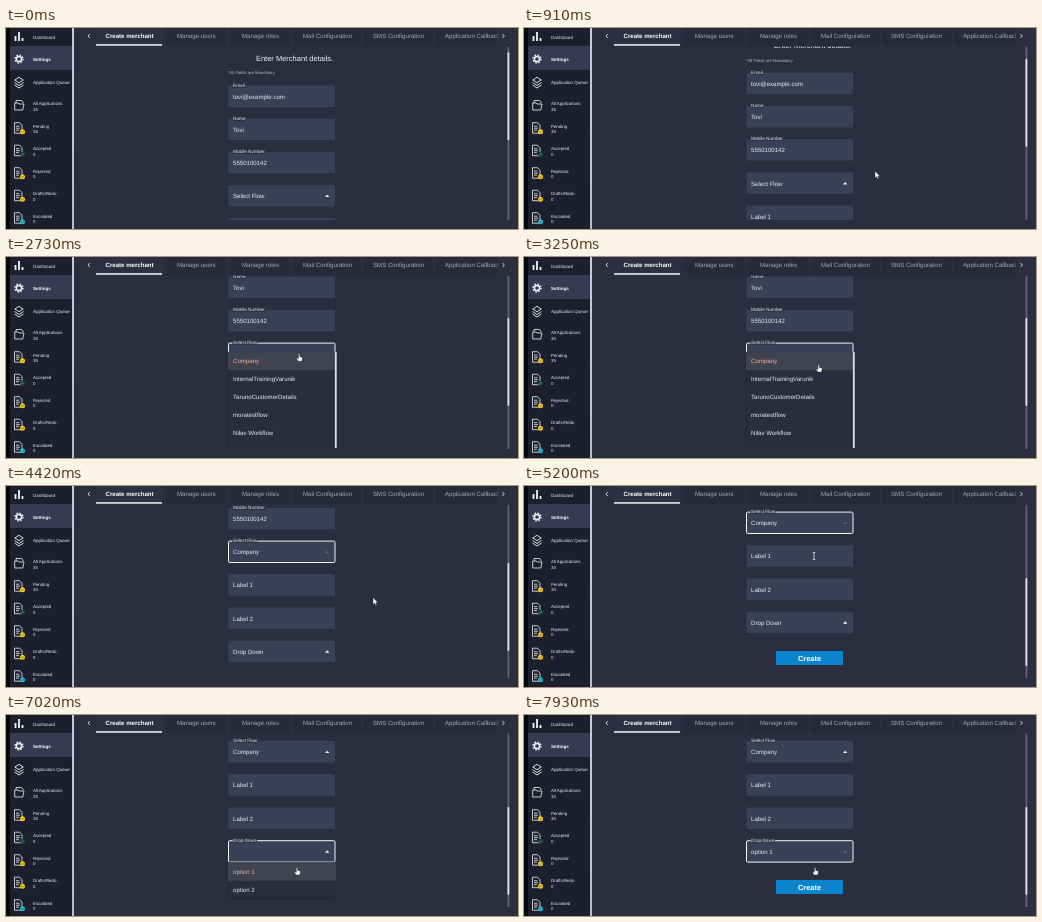
An HTML page that plays this animation: 512x201 px, repeating every 8 s.

```html
<!DOCTYPE html>
<html lang="en">
<head>
<meta charset="utf-8">
<title>Create merchant</title>
<style>
  html, body { margin: 0; width: 100%; height: 100%; overflow: hidden; background: #2b2e3f; }
  svg { display: block; width: 512px; height: 201px; }
  text { font-family: "Liberation Sans", Arial, sans-serif; text-rendering: geometricPrecision; }
</style>
</head>
<body>
<svg viewBox="0 0 512 201">
  <defs>
    <linearGradient id="edge" x2="0" y2="1">
      <stop stop-color="#c3cee0"/><stop offset="1" stop-color="#b4bfd2"/>
    </linearGradient>
    <clipPath id="view"><path d="M70 18.5H512V192H70Z"/></clipPath>
  </defs>
  <path fill="#2b2e3f" d="M0 0H512V201H0Z"/>
  <path fill="#1d1f2d" d="M0 0H66V201H0Z"/>
  <path fill="#07080c" d="M0 0H4V201H0Z"/>
  <path fill="url(#edge)" d="M66 0H68V201H66Z"/>
  <g id="side"></g>
  <g id="tabs"></g>
  <g id="form" clip-path="url(#view)"></g>
  <g id="pointer"></g>
</svg>
<script>
const LOOP = 8000, STEP = 130;
const BG = '#2b2e3f', FIELD = '#3a4157', WHITE = '#f2f4f8';
const $ = id => document.getElementById(id);

const text = (x, y, s, size = 6.1, fill = '#e8eaf0', more = '') =>
  `<text x="${x}" y="${y + size * .35}" font-size="${size}" fill="${fill}" ${more}>${s}</text>`;
const rect = (x, y, w, h, fill, more = '') =>
  `<rect x="${x}" y="${y}" width="${w}" height="${h}" fill="${fill}" ${more}/>`;
const path = (d, more) => `<path d="${d}" ${more}/>`;
const line = (d, width = 1, color = WHITE) =>
  path(d, `fill="none" stroke="${color}" stroke-width="${width}"`);

// Linear interpolation through [time, ...values] keys
function at(keys, t) {
  const i = keys.findIndex(k => k[0] > t);
  if (i < 0) return keys[keys.length - 1].slice(1);
  if (i === 0) return keys[0].slice(1);
  const a = keys[i - 1], b = keys[i], p = (t - a[0]) / (b[0] - a[0]);
  return a.slice(1).map((v, n) => v + (b[n + 1] - v) * p);
}

function sidebar() {
  let out = rect(4, 18, 62, 24, '#373a51');
  out += line('M9.5 13V8M13 13V4M16.5 13V10', 1.8);
  out += `<circle cx="13" cy="31" r="2.6" fill="none" stroke="${WHITE}" stroke-width="1.5"/>`;
  out += `<circle cx="13" cy="31" r="4" fill="none" stroke="${WHITE}" stroke-width="1.3" stroke-dasharray="1.6 1.54"/>`;
  out += line('M13 49.3L17.2 52L13 54.7L8.8 52ZM8.5 54.5L13 57.5L17.5 54.5M8.5 57L13 60L17.5 57', .9);
  out += line('M10 75V72.5H15.5L17 74V75M8.7 82V75H12L13 76H18L16.8 82Z', .8);
  out += text(27, 9, 'Dashboard', 4.5) + text(27, 31, 'Settings', 4.5, '#fff', 'font-weight="bold"')
    + text(27, 54, 'Application Queue', 4.5);
  const rows = [['All Applications', 35], ['Pending', 35, '#f8d010'], ['Accepted', 0, '#174a3a'],
    ['Rejected', 0, '#f0c814'], ['Drafts/Redo', 0, '#f0c814'], ['Escalated', 0, '#25b9d0']];
  rows.forEach(([name, count, badge], i) => {
    const y = 75.7 + i * 22.5;
    out += text(27, y, name, 4.4) + text(27, y + 5.5, count, 4.4);
    if (!badge) return;
    out += line(`M8.5 ${y - 3.5}H13.5L16 ${y - 1}V${y + 7}H8.5ZM10 ${y}H13.5M10 ${y + 2}H14M10 ${y + 4}H13`, .8);
    out += `<circle cx="16.5" cy="${y + 5.5}" r="2.5" fill="${badge}"/>`;
    out += line(`M15.4 ${y + 5.5}l.9 .9l1.4 -1.7`, .5, i === 2 ? '#3ecf8e' : '#30342c');
  });
  return out;
}

function tabBar() {
  const tabs = [[90, 66, 'Create merchant', 99.5], [160, 60, 'Manage users', 171], [224, 59, 'Manage roles', 236],
    [287, 68, 'Mail Configuration', 297], [358, 69, 'SMS Configuration', 367], [430, 62, 'Application Callback', 439]];
  let out = tabs.map(([x, w, name, tx], i) => rect(x, 0, w, 18, i ? '#272a3a' : '#2d3042')
    + text(tx, i ? 8 : 7.5, name, 6.1, i ? '#a4a8b5' : '#fff', i ? '' : 'font-weight="bold"')).join('');
  out += rect(90, 16.2, 66, 1.5, WHITE) + rect(491.5, 0, 20.5, 18, BG);
  return out + line('M83.8 6L82 8L83.8 10M496.5 6L498.3 8L496.5 10', .8);
}

function field(y, o) {
  const { label, value, select, focus, hover, float = value, hint, dim } = o;
  const border = focus ? WHITE : hover ? '#8d94a5' : 'none';
  let out = rect(222.5, y - 11, 106.5, 21.4, FIELD, `rx="1.2" stroke="${border}" stroke-width="${focus ? 1 : .7}"`);
  if (float) out += text(227, y - 11.5, label, 4.7, '#e8eaf0', `paint-order="stroke" stroke="${BG}" stroke-width="1.6"`);
  else out += text(227, y, label);
  if (value) out += text(227, y, value);
  if (hint) out += text(227, y, hint, 6.1, '#545c72');
  if (select) out += path(`M319 ${y + 1}L321.2 ${y - 1.4}L323.4 ${y + 1}Z`, `fill="${dim ? '#566078' : WHITE}"`);
  return out;
}

function panel(y, h, options, opacity, bar) {
  const rows = options.map((s, i) => (i ? '' : rect(222, y, 108, 18, '#414350'))
    + text(227, y + 9 + i * 18, s, 6.1, i ? '#e8eaf0' : '#f2ae9a')).join('');
  return `<g opacity="${opacity}">${rect(222, y, 108, h, '#2a2d3d', 'stroke="#20222f" stroke-width=".5"')}${rows}`
    + (bar ? rect(328.9, y, 1.8, h - 1, '#dfe2e8') : '') + '</g>';
}

const scrollKeys = [[780, 0], [910, 12.7], [1170, 36], [1300, 36], [1560, 71], [4030, 71],
  [4420, 102], [4680, 131]];
const pointerKeys = [[520, 400, 155], [650, 351, 143], [1560, 351, 143], [1950, 292.7, 94], [2600, 292.7, 94],
  [3250, 294.7, 107.5], [3640, 294.7, 107.5], [4160, 367, 111.5], [4810, 367, 111.5], [5200, 290, 70],
  [5720, 290, 70], [6110, 292, 132], [6500, 292, 132], [7020, 291, 152.5]];
const flows = ['Company', 'InternalTrainingVarunik', 'TarunoCustomerDetails', 'moratestflow', 'Nilav Workflow'];

function form(t) {
  const [scroll] = at(scrollKeys, t);
  const flowOpen = t >= 2340 && t < 3640, flowSet = t >= 3640;
  const labelFocus = t >= 5330 && t < 6240;
  const dropOpen = t >= 6370 && t < 7800, dropSet = t >= 7800;
  const flowFocus = t >= 1950 && t < 5330;
  const Y = n => 68.5 + n * 33.2 - scroll;
  let out = text(288.5, 30 - scroll, 'Enter Merchant details.', 7.5, WHITE, 'text-anchor="middle"')
    + text(222, 45 - scroll, '*All Fields are Mandatory', 4.2, '#b4b8c4');
  [
    { label: 'Email', value: 'tovi@example.com' },
    { label: 'Name', value: 'Tovi' },
    { label: 'Mobile Number', value: '5550100142' },
    { label: 'Select Flow', value: flowSet && 'Company', float: flowOpen || flowSet, select: true,
      focus: flowFocus, dim: flowSet && flowFocus },
    { label: 'Label 1', focus: labelFocus, float: labelFocus, hint: labelFocus && 'Placeholder 1' },
    { label: 'Label 2' },
    { label: 'Drop Down', value: dropSet && 'option 1', float: dropOpen || dropSet, select: true,
      focus: t >= 6240, hover: t >= 5980, dim: dropSet }
  ].forEach((o, i) => { out += field(Y(i), o); });
  const by = 303 - scroll;
  out += rect(252, by - 7, 67, 14, '#0a84cc', 'rx=".8"')
    + text(285.5, by, 'Create', 7.4, '#fff', 'text-anchor="middle" font-weight="bold"');
  if (flowOpen) out += panel(Y(3) - 2, 97, flows, t < 2470 ? .5 : 1, true);
  if (dropOpen) out += panel(Y(6) + 11, 36, ['option 1', 'option 2'], t < 6500 ? .5 : 1);
  return out + rect(501.5, 18.5, 1.8, 174, '#5d6374')
    + rect(501.5, 24.3 + scroll * .516, 1.8, 88, '#dfe3ea', 'rx=".8"');
}

function pointer(t) {
  if (t < 520) return '';
  const [x, y] = at(pointerKeys, t);
  let shape;
  if (x > 330) shape = path('M0 0V7L1.6 5.6L2.7 8L3.8 7.5L2.8 5.2H5Z', `fill="#fff" stroke="#111" stroke-width=".4"`);
  else if (t >= 5070 && t < 5850) shape = line('M-1.2 -3.5H1.2M0 -3.5V3.5M-1.2 3.5H1.2', .7);
  else shape = path('M-.7 .4Q0 -.6 .7 .4V3L3 3.6Q3.6 3.9 3.4 4.8L2.7 7.6H-.9L-2.7 4.8Q-2.4 3.8 -.7 5Z',
    'fill="#fff" stroke="#111" stroke-width=".4"');
  return `<g transform="translate(${x} ${y})">${shape}</g>`;
}

$('side').innerHTML = sidebar();
$('tabs').innerHTML = tabBar();
const start = performance.now();
let shown = -1;
function draw() {
  const t = Math.floor((performance.now() - start) % LOOP / STEP) * STEP;
  if (t !== shown) {
    shown = t;
    $('form').innerHTML = form(t);
    $('pointer').innerHTML = pointer(t);
  }
  requestAnimationFrame(draw);
}
draw();
</script>
</body>
</html>
```
